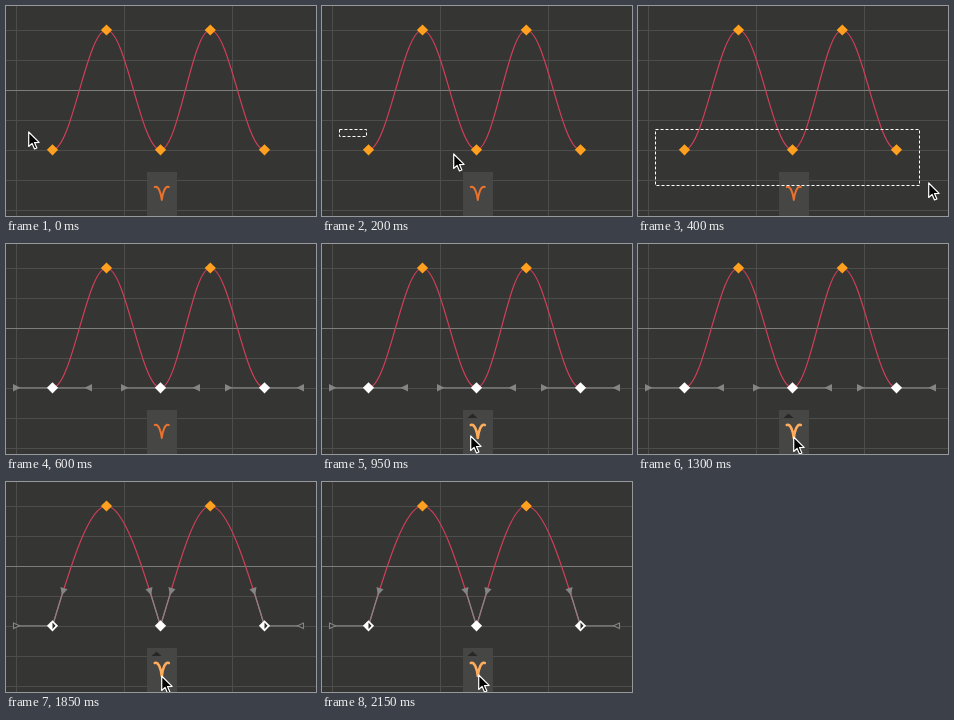
An HTML page with a canvas that plays this animation: 310x210 px, repeating every 2200 ms.

```html
<!DOCTYPE html>
<html lang="en">
<head>
<meta charset="utf-8">
<title>Curve handles</title>
<style>
  html, body { margin: 0; width: 100%; height: 100%; overflow: hidden; background: #353533; }
  canvas { display: block; width: 310px; height: 210px; }
</style>
</head>
<body>
<canvas id="stage"></canvas>
<script>
const W = 310, H = 210, LOOP = 2200, STEP = 50;
const canvas = document.getElementById('stage');
const ctx = canvas.getContext('2d');
const ratio = window.devicePixelRatio || 1;
canvas.width = W * ratio;
canvas.height = H * ratio;

const LOW = 143.8, HIGH = 24;
const LOW_KEYS = [46.5, 154.5, 258.5];
const HIGH_KEYS = [100.5, 204.3];
const HANDLE = 36, STEEP = { x: 10.5, y: -34.4 };
const ORANGE = '#ffa01f', GREY = '#858585';

const T = { drag: 150, selected: 450, leave: 600, hover: 950, broken: 1400 };
const DRAG_START = [17, 123];

// Pointer stops: time, x, y. Each holds until the next one.
const POINTER = [
  [0, 22, 125], [50, 18, 120], [100, 17, 123], [150, 45, 131],
  [200, 131, 147], [250, 204, 163], [300, 255, 174], [350, 282, 180],
  [400, 290, 176], [450, 295, 177], [500, 299, 177], [550, 301, 177],
  [950, 148, 191], [1000, 152, 192], [1100, 154, 192], [1300, 155, 192],
  [1850, 155, 193], [2150, 156, 192]
];

function pointerAt(time) {
  return POINTER.filter(stop => stop[0] <= time).pop().slice(1);
}

function line(x1, y1, x2, y2, color, width = 1) {
  ctx.strokeStyle = color;
  ctx.lineWidth = width;
  ctx.beginPath();
  ctx.moveTo(x1, y1);
  ctx.lineTo(x2, y2);
  ctx.stroke();
}

function polygon(points, fill, stroke, width = 1) {
  ctx.beginPath();
  points.forEach(([x, y]) => ctx.lineTo(x, y));
  ctx.closePath();
  if (fill) {
    ctx.fillStyle = fill;
    ctx.fill();
  }
  if (stroke) {
    ctx.strokeStyle = stroke;
    ctx.lineWidth = width;
    ctx.stroke();
  }
}

function drawGrid() {
  ctx.fillStyle = '#353533';
  ctx.fillRect(0, 0, W, H);
  for (let x = 10.5; x < W; x += 108) line(x, 0, x, H, '#4d4d4b');
  for (let y = 24.5; y < H; y += 30) line(0, y, W, y, y === 84.5 ? '#7d7d7b' : '#4d4d4b');
}

function drawCurve(broken) {
  ctx.strokeStyle = '#cf3f58';
  ctx.lineWidth = 1.2;
  for (const low of LOW_KEYS) {
    for (const high of HIGH_KEYS) {
      const span = high - low;
      if (Math.abs(span) > 60) continue;
      const reach = span * (broken ? 1 / 3 : 0.364);
      const rise = broken ? Math.abs(reach) * STEEP.y / STEEP.x : 0;
      ctx.beginPath();
      ctx.moveTo(low, LOW);
      ctx.bezierCurveTo(low + reach, LOW + rise, high - reach, HIGH, high, HIGH);
      ctx.stroke();
    }
  }
}

// A handle ends in a small arrowhead that points back at its key.
function drawHandle(key, dx, dy, hollow) {
  line(key, LOW, key + dx, LOW + dy, GREY, 1.3);
  ctx.save();
  ctx.translate(key + dx, LOW + dy);
  ctx.rotate(Math.atan2(-dy, -dx));
  const head = [[-3.5, -3.7], [4, 0], [-3.5, 3.7]];
  if (hollow) polygon([[-3, -2.8], [3, 0], [-3, 2.8]], '#353533', GREY, 1.1);
  else polygon(head, GREY);
  ctx.restore();
}

function drawHandles(broken) {
  LOW_KEYS.forEach((key, i) => {
    for (const side of [-1, 1]) {
      const outer = (i === 0 && side < 0) || (i === 2 && side > 0);
      if (broken && !outer) drawHandle(key, side * STEEP.x, STEEP.y, false);
      else drawHandle(key, side * HANDLE, 0, broken);
    }
  });
}

function drawKey(x, y, color, split) {
  const r = 5.6;
  polygon([[x, y - r], [x + r, y], [x, y + r], [x - r, y]], color);
  if (split) polygon([[x, y - 3.3], [x + 3, y], [x, y + 3.3]], '#2b2b2a');
}

function drawButton(hover) {
  ctx.fillStyle = '#464645';
  ctx.fillRect(141, 166, 30, 44);
  if (hover) polygon([[145.5, 174], [150.5, 169.5], [155.5, 174]], '#272727');
  ctx.strokeStyle = hover ? '#ffad5c' : '#e8722e';
  ctx.lineWidth = hover ? 2.6 : 2;
  ctx.lineCap = 'round';
  ctx.lineJoin = 'round';
  ctx.beginPath();
  ctx.moveTo(148.8, 181);
  ctx.bezierCurveTo(152.5, 179.5, 155, 187, 155.8, 194);
  ctx.bezierCurveTo(156.6, 187, 159, 179.5, 162.8, 181);
  ctx.stroke();
  ctx.lineCap = 'butt';
  ctx.lineJoin = 'miter';
}

function drawSelection([x, y]) {
  const [left, top] = DRAG_START;
  ctx.strokeStyle = '#ffffff';
  ctx.lineWidth = 1;
  ctx.setLineDash([3, 2]);
  ctx.strokeRect(left + 0.5, top + 0.5, x - left - 1, y - top - 1);
  ctx.setLineDash([]);
}

function drawPointer([x, y]) {
  ctx.save();
  ctx.translate(x + 0.7, y + 1);
  ctx.lineJoin = 'round';
  polygon([[0, 0], [0, 14.5], [3.4, 11.4], [5.8, 17], [8.2, 16], [5.8, 10.6], [10.4, 10.4]],
    '#050505', '#ffffff', 1.2);
  ctx.restore();
}

function render(time) {
  const selected = time >= T.selected;
  const broken = time >= T.broken;
  const hover = time >= T.hover;

  ctx.setTransform(ratio, 0, 0, ratio, 0, 0);
  drawGrid();
  drawCurve(broken);
  if (selected) drawHandles(broken);
  LOW_KEYS.forEach((x, i) => drawKey(x, LOW, selected ? '#ffffff' : ORANGE, broken && i !== 1));
  HIGH_KEYS.forEach(x => drawKey(x, HIGH, ORANGE, false));
  drawButton(hover);

  // The marquee trails the pointer by one step.
  if (time >= T.drag && !selected) drawSelection(pointerAt(time - STEP));
  if (time < T.leave || hover) drawPointer(pointerAt(time));
}

function tick() {
  render(performance.now() % LOOP);
  requestAnimationFrame(tick);
}
tick();
</script>
</body>
</html>
```
